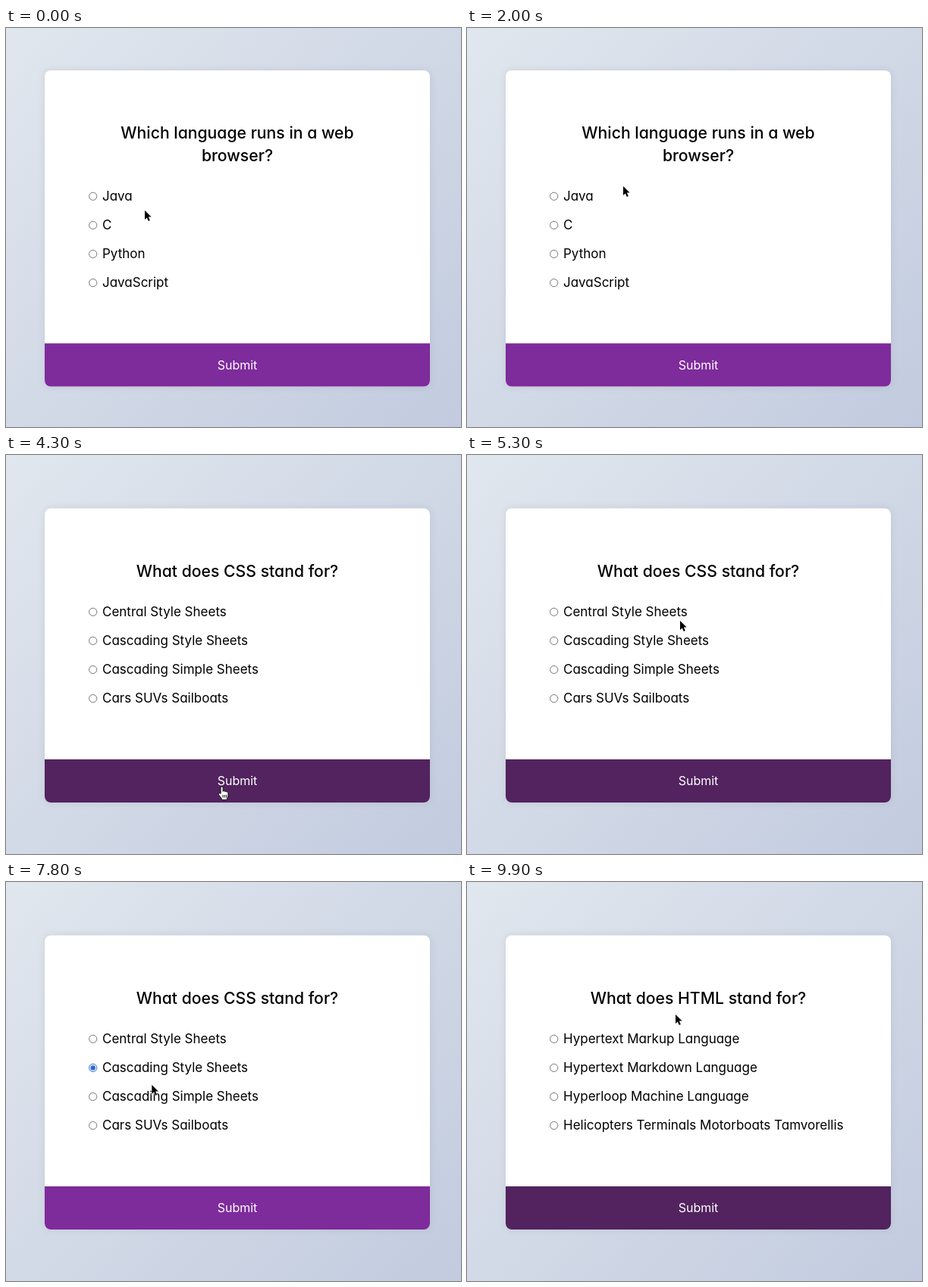
An HTML page for the animation above (10 s loop, 600x527 px).

```html
<!DOCTYPE html>
<html lang="en">
<head>
<meta charset="utf-8">
<title>Quiz</title>
<style>
  html, body { margin: 0; height: 100%; overflow: hidden; }
  body { background: linear-gradient(135deg, #e1e7ee, #c2cbdf); }
  svg { display: block; width: 600px; height: 527px; font: 17px Inter, sans-serif; font-feature-settings: "cv11"; }
  #card { fill: #fff; filter: drop-shadow(0 0 5px rgba(100, 100, 100, .16)); }
  .title { font-size: 21.2px; font-weight: 500; text-anchor: middle; }
  #submit { font-size: 16px; fill: #fff; text-anchor: middle; }
  .ring { fill: #fff; }
  .dot { fill: #2b68d8; }
  #arrow { stroke: #fff; stroke-width: 1.4; paint-order: stroke; }
  #hand { fill: #fff; stroke: #111; stroke-linejoin: round; }
</style>
</head>
<body>
<svg viewBox="0 0 600 527">
  <rect id="card" x="51" width="508" rx="8"/>
  <path id="button"/>
  <text id="submit" x="305">Submit</text>
  <g id="content"></g>
  <g id="cursor">
    <path id="arrow" d="M0 0V12l2.8-2.6 2 4.6 2-.9-2-4.5h3.8z"/>
    <path id="hand" d="M-1.5 9V1.2a1.5 1.5 0 0 1 3 0V6a1.3 1.3 0 0 1 2.5.3a1.3 1.3 0 0 1 2.3.5a1.2 1.2 0 0 1 2 1V11q0 2-1.5 4v2h-7v-1.5q-2-2.5-4-5.5q-.6-1.8 1-1.8q1 .2 1.7 1zM1.4 10.5v3.5M3.6 10.5v3.5M5.8 10.5v3.5"/>
  </g>
</svg>
<script>
const LOOP = 10000, STEP = 100;
const questions = [
  { title: ["Which language runs in a web", "browser?"],
    answers: ["Java", "C", "Python", "JavaScript"] },
  { title: ["What does CSS stand for?"],
    answers: ["Central Style Sheets", "Cascading Style Sheets", "Cascading Simple Sheets", "Cars SUVs Sailboats"] },
  { title: ["What does HTML stand for?"],
    answers: ["Hypertext Markup Language", "Hypertext Markdown Language", "Hyperloop Machine Language",
              "Helicopters Terminals Motorboats Tamvorellis"] }
];
// Clicks: from this time on, which question, chosen answer and button focus
const states = [
  { at: 0, question: 0, chosen: -1, focus: false },
  { at: 2900, question: 0, chosen: 3, focus: false },
  { at: 4300, question: 1, chosen: -1, focus: true },
  { at: 7500, question: 1, chosen: 1, focus: false },
  { at: 9300, question: 2, chosen: -1, focus: true }
];
// Pointer way points: time, x, y
const route = [
  [0, 183, 241], [500, 192, 228], [1100, 222, 190], [1500, 226, 186], [2000, 206, 209],
  [2200, 180, 318], [2500, 166, 335], [3300, 168, 337], [3800, 266, 405], [4050, 283, 440],
  [4400, 285, 438], [4900, 282, 290], [5300, 281, 219], [5500, 272, 234], [5900, 240, 246],
  [6600, 185, 248], [7000, 180, 245], [7600, 180, 245], [8100, 215, 310], [8500, 262, 402],
  [8800, 284, 428], [9400, 286, 427], [9900, 275, 175], [10000, 275, 175]
];

const $ = id => document.getElementById(id);
const set = (node, attrs) => {
  for (const name in attrs) node.setAttribute(name, attrs[name]);
  return node;
};
const add = (parent, tag, attrs, text = "") => {
  const node = set(document.createElementNS("http://www.w3.org/2000/svg", tag), attrs);
  node.textContent = text;
  return parent.appendChild(node);
};

const pages = questions.map(({ title, answers }) => {
  const group = add($("content"), "g", {});
  const top = title.length > 1 ? 56 : 70.5;
  const first = title.length > 1 ? 222.3 : 207.3;
  title.forEach((line, i) => add(group, "text", { class: "title", x: 305, y: top + 90 + i * 29.5 }, line));
  const options = answers.map((answer, i) => {
    const y = first + i * 38.1;
    return {
      y,
      ring: add(group, "circle", { class: "ring", cx: 114.7, cy: y, r: 5.1 }),
      dot: add(group, "circle", { class: "dot", cx: 114.7, cy: y, r: 3.2 }),
      label: add(group, "text", { x: 127, y: y + 5.8 }, answer)
    };
  });
  return { group, options, top, bottom: 529.5 - top };
});

function pointerAt(t) {
  const i = route.findIndex(point => point[0] > t);
  const [t0, x0, y0] = route[i - 1], [t1, x1, y1] = route[i];
  const p = (t - t0) / (t1 - t0), e = p * p * (3 - 2 * p);
  return [x0 + (x1 - x0) * e, y0 + (y1 - y0) * e];
}

function draw(now) {
  const t = Math.floor(now % LOOP / STEP) * STEP;
  const { question, chosen, focus } = states.findLast(state => state.at <= t);
  const [x, y] = pointerAt(t);
  const page = pages[question], buttonTop = page.bottom - 57;
  const onButton = y >= buttonTop;
  let onLabel = false;

  pages.forEach(p => set(p.group, { display: p === page ? "inline" : "none" }));
  page.options.forEach((option, i) => {
    const hover = Math.abs(y - option.y) < 11 && x > 109 && x < 127 + option.label.getComputedTextLength();
    onLabel ||= hover;
    const on = i === chosen;
    set(option.ring, { stroke: on ? "#2b68d8" : hover ? "#4a4a4a" : "#767676" });
    set(option.dot, { display: on ? "inline" : "none" });
  });

  set($("card"), { y: page.top, height: page.bottom - page.top });
  set($("button"), {
    d: `M51 ${buttonTop}h508v49a8 8 0 0 1-8 8h-492a8 8 0 0 1-8-8z`,
    fill: focus ? "#52235f" : onButton ? "#63177f" : "#7e2b9c"
  });
  set($("submit"), { y: buttonTop + 34.2 });

  const hand = onLabel || onButton;
  set($("cursor"), { transform: `translate(${x} ${y})` });
  set($("hand"), { display: hand ? "inline" : "none" });
  set($("arrow"), { display: hand ? "none" : "inline" });
}

const start = performance.now();
(function tick() {
  draw(performance.now() - start);
  requestAnimationFrame(tick);
})();
</script>
</body>
</html>
```
